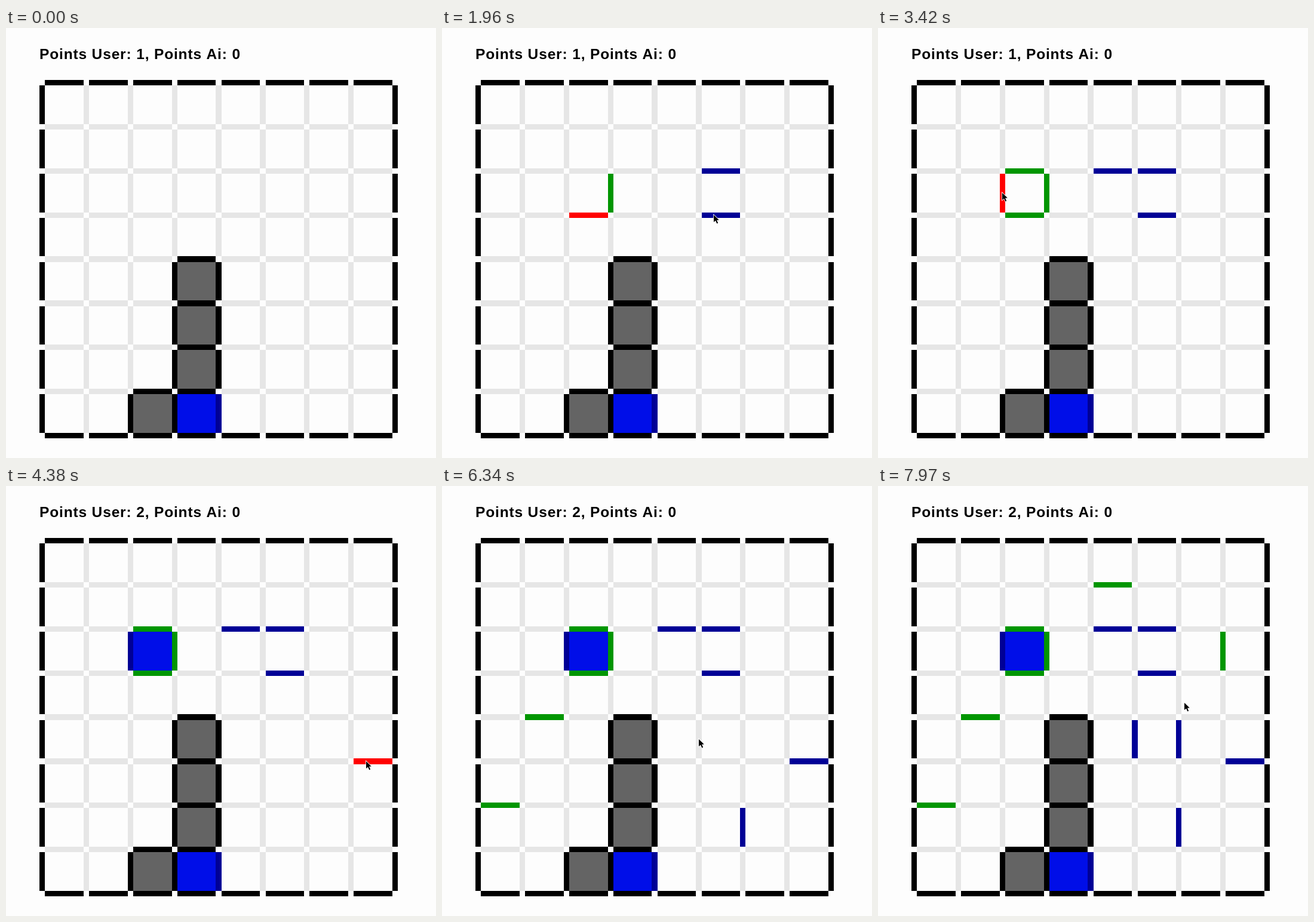
Recreate the animation shown at these times as an HTML page with a canvas. Size 720 px wide and 720 px high, loop 8000 ms.

```html
<!DOCTYPE html>
<html lang="en">
<head>
<meta charset="utf-8">
<title>Boxes</title>
<style>
  html, body { margin: 0; width: 100%; height: 100%; overflow: hidden; background: #fdfdfd; }
  canvas { display: block; width: 720px; height: 720px; }
</style>
</head>
<body>
<canvas id="stage" width="720" height="720"></canvas>
<script>
const ctx = document.getElementById('stage').getContext('2d');
const LOOP = 8000, FLASH = 300, REST = 400;
const N = 8, SCALE = 12 / 13, PITCH = 80 * SCALE, EDGE = 10 * SCALE;
const LEFT = 56.1, TOP = 87.1;
const PAPER = '#fdfdfd', IDLE = '#e6e6e6', WALL = '#000', BLOCK = '#646464';
const USER = '#000096', USER_BOX = '#000ee8', AI = '#009600', RED = '#ff0000';

const blocks = [[4, 3], [5, 3], [6, 3], [7, 2]];

// An edge is named by direction, row and column; a turn without reply scores.
const turns = [
  { at: 750, edge: 'h25', reply: 'v23' },
  { at: 1600, edge: 'h35', reply: 'h32' },
  { at: 2500, edge: 'h24', reply: 'h22' },
  { at: 3390, edge: 'v22' },
  { at: 4300, edge: 'h57', reply: 'h41' },
  { at: 5420, edge: 'v66', reply: 'h60' },
  { at: 6380, edge: 'v45', reply: 'h14' },
  { at: 7150, edge: 'v46', reply: 'v27' }
];
const scoreTime = turns.find(turn => !turn.reply).at + FLASH;

function edgeRect([dir, row, col]) {
  const x = LEFT + col * PITCH, y = TOP + row * PITCH;
  return dir === 'h'
    ? [x + EDGE, y, x + PITCH, y + EDGE]
    : [x, y + EDGE, x + EDGE, y + PITCH];
}

function fill(rect, color) {
  const [x0, y0, x1, y1] = rect.map(Math.round);
  ctx.fillStyle = color;
  ctx.fillRect(x0, y0, x1 - x0, y1 - y0);
}

function drawEdge(name, color) {
  fill(edgeRect(name), color);
}

function drawBox(row, col, color) {
  const x = LEFT + col * PITCH, y = TOP + row * PITCH;
  fill([x + EDGE, y + EDGE, x + PITCH, y + PITCH], color);
}

function drawBoard() {
  for (let line = 0; line <= N; line++) {
    const color = line % N ? IDLE : WALL;
    for (let i = 0; i < N; i++) {
      drawEdge(`h${line}${i}`, color);
      drawEdge(`v${i}${line}`, color);
    }
  }
  for (const [r, c] of blocks) {
    drawBox(r, c, BLOCK);
    for (const name of [`h${r}${c}`, `h${r + 1}${c}`, `v${r}${c}`, `v${r}${c + 1}`]) {
      drawEdge(name, WALL);
    }
  }
  drawBox(7, 3, USER_BOX);
  drawEdge('v74', USER);
}

function drawMove(name, start, color, t) {
  if (name && t >= start) drawEdge(name, t < start + FLASH ? RED : color);
}

// The pointer eases from one clicked edge to the next and rests after each click.
function stopAt({ at, edge }) {
  const [x0, y0, x1, y1] = edgeRect(edge);
  const lean = edge[0] === 'h' ? -12 : 0;
  return { arrive: at - 70, leave: at + REST, x: (x0 + x1) / 2 + lean, y: (y0 + y1) / 2 };
}
const stops = [
  { arrive: 0, leave: 150, x: 724, y: 330 },
  ...turns.map(stopAt),
  { arrive: 7900, leave: LOOP, x: 513, y: 363 }
];

function drawPointer(t) {
  const i = stops.findIndex(stop => t < stop.leave);
  const to = stops[i], from = stops[Math.max(0, i - 1)];
  const u = Math.min(1, Math.max(0, (t - from.leave) / (to.arrive - from.leave)));
  const k = i ? u * u * (3 - 2 * u) : 0;
  ctx.save();
  ctx.translate(Math.round(from.x + (to.x - from.x) * k), Math.round(from.y + (to.y - from.y) * k));
  ctx.beginPath();
  [[0, 0], [0, 12], [3, 9.5], [5.3, 14.5], [7.2, 13.6], [5, 8.8], [8.8, 8.5]]
    .forEach(([x, y]) => ctx.lineTo(x, y));
  ctx.closePath();
  ctx.lineWidth = 1.6;
  ctx.strokeStyle = '#fff';
  ctx.stroke();
  ctx.fillStyle = '#000';
  ctx.fill();
  ctx.restore();
}

function draw(t) {
  const scored = t >= scoreTime;
  ctx.fillStyle = PAPER;
  ctx.fillRect(0, 0, 720, 720);
  drawBoard();
  for (const { at, edge, reply } of turns) {
    drawMove(edge, at, USER, t);
    drawMove(reply, at + FLASH, AI, t);
  }
  if (scored) drawBox(2, 2, USER_BOX);

  ctx.fillStyle = '#000';
  ctx.font = 'bold 24.5px "Liberation Sans", Arial, sans-serif';
  ctx.letterSpacing = '0.85px';
  ctx.fillText(`Points User: ${scored ? 2 : 1}, Points Ai: 0`, 56, 51.5);

  drawPointer(t);
}

function tick() {
  draw(performance.now() % LOOP);
  requestAnimationFrame(tick);
}
tick();
</script>
</body>
</html>
```
